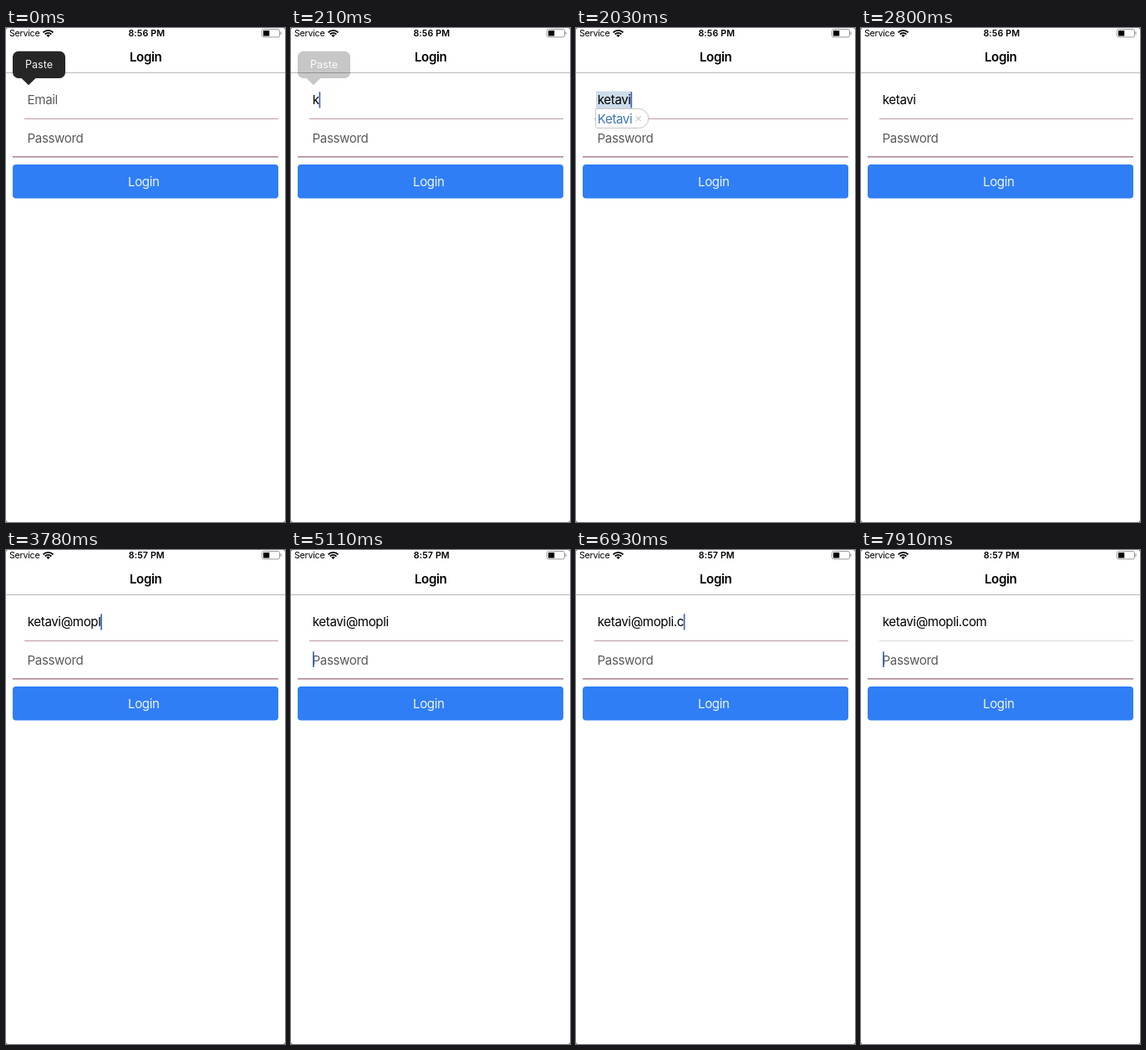
Write an HTML page that moves like this. It is 334 px wide and 590 px high and loops after 8000 ms.

```html
<!DOCTYPE html>
<html lang="en">
<head>
<meta charset="utf-8">
<title>Login form</title>
<style>
  html, body { margin: 0; width: 100%; height: 100%; overflow: hidden; background: #fff; }
  svg { display: block; width: 100%; height: 100%; }
  text { font-family: Inter, Roboto, "Liberation Sans", sans-serif; white-space: pre; }
  .body { font-size: 15.14px; letter-spacing: -0.4px; }
  .status { font-size: 10.7px; }
  .bold { font-weight: 600; }
  .mid { text-anchor: middle; }
  .hint { fill: #5a5a5a; }
  .caret { fill: #3f63c0; }
</style>
</head>
<body>
<svg viewBox="0 0 334 590" xmlns="http://www.w3.org/2000/svg">
  <rect width="334" height="590" fill="#333"/>
  <rect width="334" height="590" rx="2" fill="#fff"/>

  <!-- status bar -->
  <text class="status" x="4" y="10.2" letter-spacing="-0.25">Service</text>
  <g fill="none" stroke="#000" stroke-width="1.8">
    <path d="M44.5 5.4A8.3 8.3 0 0 1 56.5 5.4"/>
    <path d="M46.7 7.5A5.3 5.3 0 0 1 54.3 7.5"/>
  </g>
  <path d="M50.5 11L48.3 8.8A3.1 3.1 0 0 1 52.7 8.8Z"/>
  <text id="clock" class="status bold mid" x="168.3" y="10.2" letter-spacing="0.1"></text>
  <rect x="306.5" y="1.5" width="21" height="9.4" rx="2" fill="none" stroke="#9a9a9a"/>
  <rect x="308" y="3" width="7.3" height="6.5" rx="0.6"/>
  <path d="M329 4.6V7.8" stroke="#9a9a9a" stroke-width="1.2"/>

  <!-- title bar -->
  <text class="body bold mid" x="167.2" y="39.5">Login</text>
  <rect y="53" width="334" height="1" fill="#b9b9b9"/>

  <!-- form -->
  <rect id="emailLine" x="22" y="108" width="304" height="1"/>
  <rect x="8" y="153" width="318" height="1.7" fill="#b48c9d"/>
  <rect id="mark" x="24" y="75.5" height="20.5" fill="#cddcea"/>
  <text id="hint" class="body hint" x="25.6" y="91.4">Email</text>
  <text id="email" class="body" x="25.8" y="91.4"></text>
  <rect id="emailCaret" class="caret" y="76.3" width="1.7" height="19.2"/>
  <text class="body hint" x="25.6" y="136.9">Password</text>
  <rect id="passCaret" class="caret" x="26" y="121.3" width="1.7" height="18.7"/>
  <rect x="8" y="163" width="318" height="40.4" rx="4" fill="#2f7ef6"/>
  <text class="body mid" x="164.8" y="188.6" fill="#eef4ff">Login</text>

  <!-- spelling bubble -->
  <g id="bubble">
    <path id="bubbleShape" fill="#fff" stroke="#c6c6c6"/>
    <text id="guess" class="body" x="25.8" y="113.6" fill="#3d75b3"></text>
    <path id="cross" d="M-3 -3L3 3M3 -3L-3 3" stroke="#b0b0b0"/>
  </g>

  <!-- paste menu -->
  <g id="menu">
    <path d="M18 59.5H36L27 68.2Z" fill="#262626"/>
    <rect x="8" y="27.7" width="63" height="32.3" rx="7" fill="#262626"/>
    <text class="mid" x="39.5" y="48.3" font-size="12.5" fill="#f4f4f4">Paste</text>
  </g>
</svg>
<script>
const LOOP = 8000, TICK = 70, LEFT = 25.8;
const ADDRESS = "ketavi@mopli.com";
const KEYS = [70, 910, 1120, 1470, 1610, 1820, 2870, 3150,
              3430, 3570, 3780, 3990, 6790, 6930, 7140, 7420];

// Each span: caret appears, starts to fade, is fully gone.
const EMAIL_CARET = [[70, 700, 840], [910, 2450, 2590], [2870, 4620, 4760],
                     [6090, 6650, 6790], [6790, 7840, 7840]];
const PASS_CARET = [[5110, 5670, 5950], [7910, LOOP, LOOP]];
const BUBBLES = [[1400, 1470], [2030, 2800]];

const $ = id => document.getElementById(id);
const show = (id, on) => $(id).setAttribute("opacity", on);
const set = (id, name, value) => $(id).setAttribute(name, value);
const write = (id, text) => { if ($(id).textContent !== text) $(id).textContent = text; };

const fade = (t, from, to) =>
  t < from ? 1 : Math.max(0, 1 - (t - from + TICK) / (to - from + TICK));

function caretAt(t, spans) {
  const span = spans.filter(s => s[0] <= t).pop();
  return span ? fade(t, span[1], span[2]) : 0;
}

function drawBubble(t, typed, end) {
  const on = BUBBLES.some(([from, to]) => t >= from && t < to) ? 1 : 0;
  show("bubble", on);
  show("mark", on);
  if (!on) return;
  write("guess", typed[0].toUpperCase() + typed.slice(1));
  const edge = LEFT + $("guess").getComputedTextLength();
  const right = edge + 19.5;
  set("mark", "width", end - 23.6);
  set("bubbleShape", "d", `M23.5 96.5H${right - 11.5}a11.5 11.5 0 0 1 0 23H25.5a2 2 0 0 1 -2 -2Z`);
  set("cross", "transform", `translate(${edge + 7.5} 108.3)`);
}

function draw(time) {
  const t = Math.floor(time / TICK) * TICK;
  const typed = ADDRESS.slice(0, KEYS.filter(k => k <= t).length);
  write("email", typed);
  write("clock", t < 3430 ? "8:56 PM" : "8:57 PM");
  show("hint", typed ? 0 : 1);
  show("menu", fade(t, 70, 280));

  const end = LEFT + (typed ? $("email").getComputedTextLength() : 0);
  set("emailCaret", "x", end - 0.2);
  show("emailCaret", caretAt(t, EMAIL_CARET));
  show("passCaret", caretAt(t, PASS_CARET));
  set("emailLine", "fill", t < 7140 ? "#bd9aa8" : t < 7210 ? "#cebcc3" : "#dedede");
  drawBubble(t, typed, end);
}

const start = performance.now();
function loop() {
  draw((performance.now() - start) % LOOP);
  requestAnimationFrame(loop);
}
loop();
</script>
</body>
</html>
```
